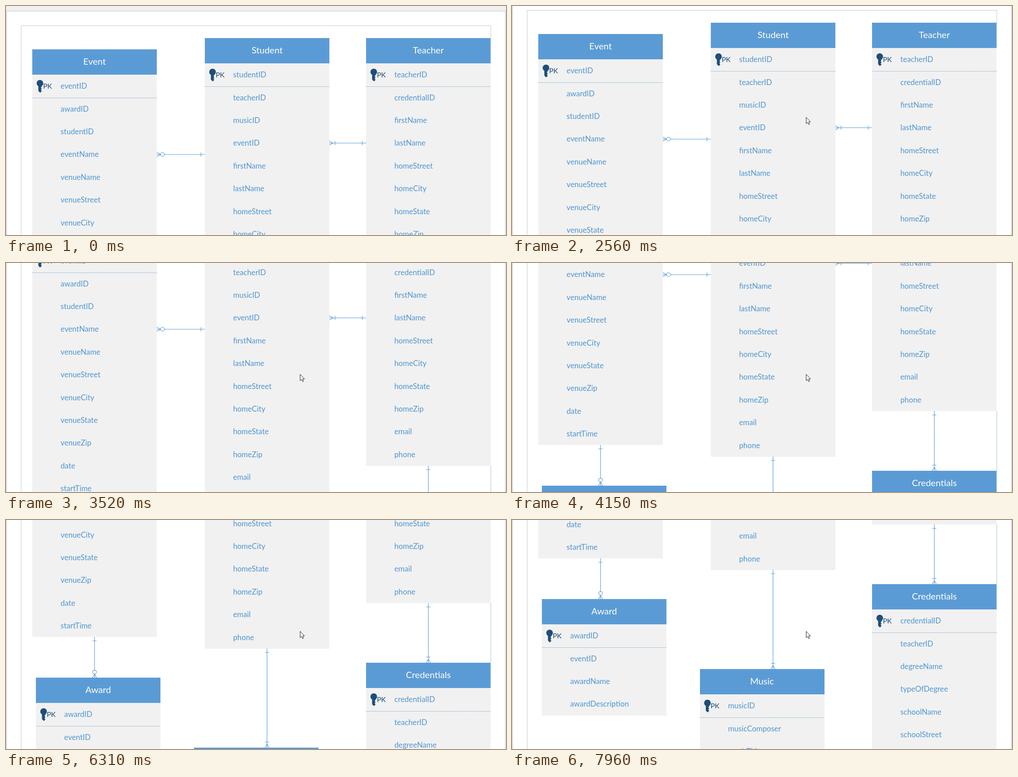
An HTML page that plays this animation: 1104x507 px, repeating every 8000 ms.

```html
<!DOCTYPE html>
<html lang="en">
<head>
<meta charset="utf-8">
<title>Entity diagram</title>
<style>
  html, body { margin: 0; width: 100%; height: 100%; overflow: hidden; background: #f0f0f0; }
  svg { display: block; width: 1104px; height: 507px; font-family: Lato, "Open Sans", sans-serif; }
  rect, .edge { shape-rendering: crispEdges; }
  .edge { fill: none; stroke: #c3c8d0; }
  .head { fill: #5b9bd5; }
  .body { fill: #f1f1f1; }
  .title { fill: #fff; font-size: 20px; text-anchor: middle; }
  .field { fill: #5096d2; font-size: 16.7px; }
  .pk { font-size: 15.6px; }
  .key { fill: #1f4e79; }
  .dots { stroke: #6b9cc9; stroke-dasharray: 1.3 1.1; }
  .link { fill: none; stroke: #5b9bd5; stroke-width: 1.15; }
  .link circle { fill: #fff; }
</style>
</head>
<body>
<svg viewBox="0 0 1104 507">
  <g id="page">
    <rect x="1" y="11" width="1102" height="1400" fill="#fff"/>
    <path class="edge" d="M1.5 1400V11.5H1102.5V1400M33.5 1400V43.5H1070.5V71"/>
    <path class="edge" d="M1070.5 631V763" style="stroke:#a9c4e2"/>
  </g>
  <path id="cursor" d="M.5 .5V14.5L3.7 11.6L5.9 16.5L8.2 15.5L6 10.7H10.2Z" fill="#fff" stroke="#222"/>
</svg>
<script>
const LOOP = 8000, HEAD = 56, ROW = 50.4, WIDTH = 275;
const page = document.getElementById('page');
const cursor = document.getElementById('cursor');

function table(x, y, title, fields) {
  const names = fields.split(' ');
  const mid = y + HEAD + ROW / 2;
  const line = y + HEAD + 51.5;
  const rows = names.map((name, i) =>
    `<text class="field" x="${x + 62.5}" y="${mid + i * ROW + 5.9}">${name}</text>`).join('');
  return `<rect class="body" x="${x}" y="${y + HEAD}" width="${WIDTH}" height="${names.length * ROW}"/>
    <rect class="head" x="${x}" y="${y}" width="${WIDTH}" height="${HEAD}"/>
    <text class="title" x="${x + WIDTH / 2}" y="${y + 34.4}">${title}</text>
    <g class="key"><g transform="translate(${x + 17} ${y + 75})"><circle r="7.3"/>
      <path d="M-3.6 5V17L.4 21L4 17.5L2 15L4 12.5L2 10.2L3.6 8V5Z"/></g>
      <text class="pk" x="${x + 24}" y="${mid + 5.9}">PK</text></g>
    <path class="dots" d="M${x} ${line}h${WIDTH}"/>${rows}`;
}

// Starts at the "many" end and runs to the "one" end.
function link(x, y, length, angle, optional) {
  const mark = optional ? '<circle cx="12.5" r="4.2"/>' : '<path d="M12.5 -4.5v9"/>';
  return `<g class="link" transform="translate(${x} ${y}) rotate(${angle})">
    <path d="M0 0H${length}M0 -4.5L8.3 0L0 4.5M${length - 8.5} -4.5v9"/>${mark}</g>`;
}

page.insertAdjacentHTML('beforeend', [
  table(58, 96, 'Event', 'eventID awardID studentID eventName venueName venueStreet venueCity venueState venueZip date startTime'),
  table(439, 71, 'Student', 'studentID teacherID musicID eventID firstName lastName homeStreet homeCity homeState homeZip email phone'),
  table(795, 71, 'Teacher', 'teacherID credentialID firstName lastName homeStreet homeCity homeState homeZip email phone'),
  table(66, 796, 'Award', 'awardID eventID awardName awardDescription'),
  table(414.5, 951, 'Music', 'musicID musicComposer musicTitle musicGenre'),
  table(795, 763, 'Credentials', 'credentialID teacherID degreeName typeOfDegree schoolName schoolStreet schoolCity'),
  link(333, 328.7, 106, 0, true),
  link(714, 303.5, 81, 0, false),
  link(195.5, 796, 90, -90, true),
  link(576.4, 951, 219.5, -90, false),
  link(932.5, 763, 132, -90, false)
].join(''));

// The screen refreshes every STEP ms from the start of each burst of motion.
const STEP = 70;
const bursts = [200, 2560, 3310, 5700, 6240, 6790, 7750];
function refreshTime(t) {
  const start = bursts.filter(b => b <= t).pop() || 0;
  return start + Math.floor((t - start) / STEP) * STEP;
}

// Each wheel notch moves the page by NOTCH with a quick ease-out.
const NOTCH = 56.45, GLIDE = 240;
const notches = [2496, 2830, 3165, 3500, 3810, 4116, 5636, 6176, 6726, 6919, 7686];
const clamp = u => Math.min(1, Math.max(0, u));
const easeOut = u => 1 - (1 - u) ** 3;
const smooth = u => u * u * (3 - 2 * u);
const scroll = t => NOTCH * notches.reduce((sum, n) => sum + easeOut(clamp((t - n) / GLIDE)), 0);

function draw(now) {
  const t = refreshTime(now % LOOP);
  page.setAttribute('transform', `translate(0 ${-Math.round(scroll(t))})`);
  const left = 1 - smooth(clamp((t - 200) / 770));
  cursor.setAttribute('visibility', t < 200 ? 'hidden' : 'visible');
  cursor.setAttribute('transform', `translate(${Math.round(649 + 364 * left)} ${Math.round(246 + 210 * left)})`);
  requestAnimationFrame(draw);
}
draw(performance.now());
</script>
</body>
</html>
```
